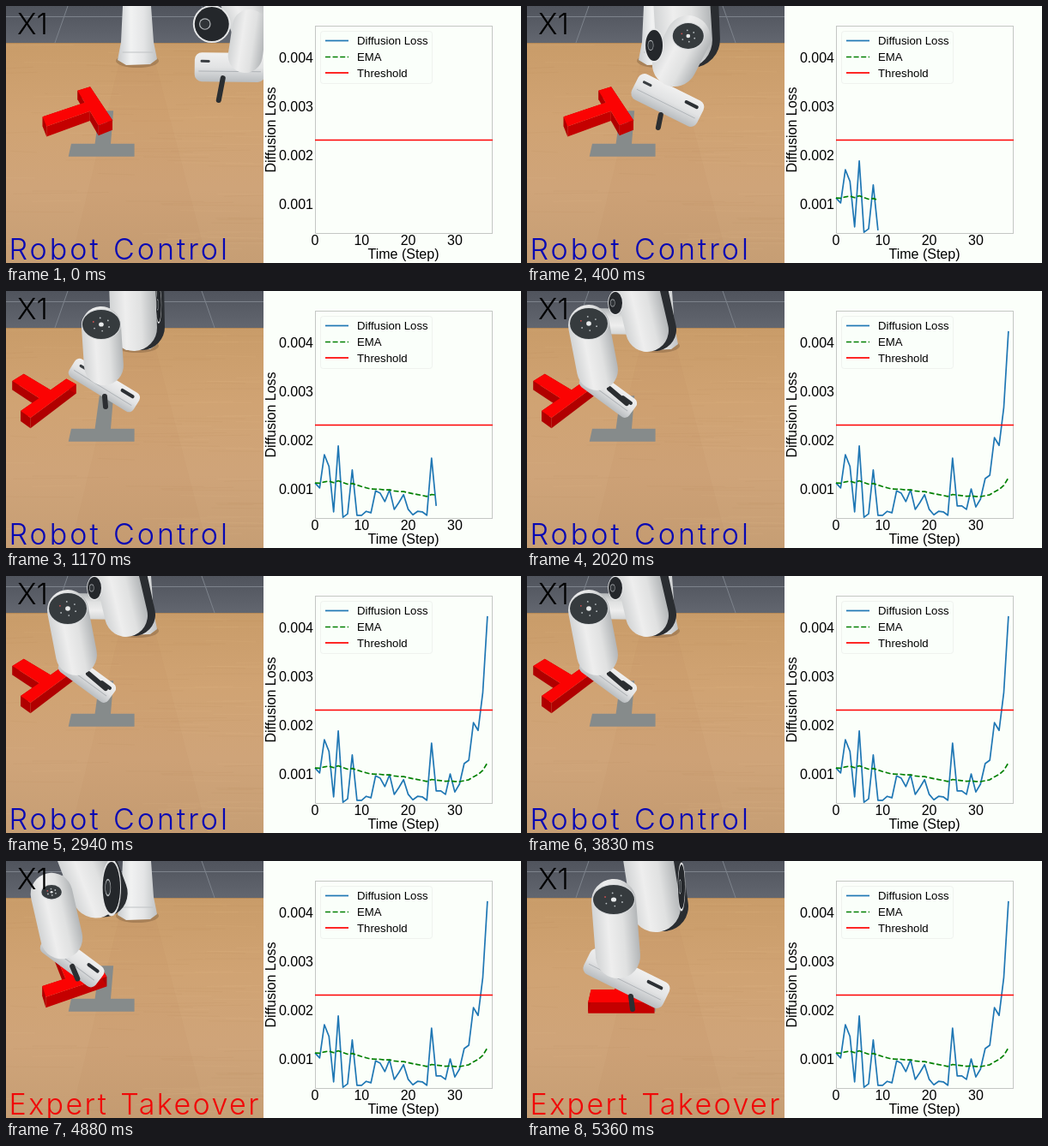
An HTML page with a canvas for the animation above (5400 ms loop, 600 px wide and 300 px high).

```html
<!DOCTYPE html>
<html lang="en">
<head>
<meta charset="utf-8">
<title>Robot control and diffusion loss</title>
<style>
  html, body { margin: 0; width: 100%; height: 100%; overflow: hidden; background: #fbfffa; }
  canvas, svg { position: absolute; left: 0; top: 0; display: block; }
  text { font: 16px "Liberation Sans", Arial, sans-serif; fill: #000; }
  .legend { font-size: 13.2px; }
  .hud { font: 300 34px Inter, "Open Sans", sans-serif; word-spacing: 2px; }
  .line { fill: none; stroke-width: 1.7; stroke-linejoin: round; }
  .loss { stroke: #1f77b4; }
  .ema { stroke: #008000; stroke-dasharray: 6 2.6; }
  .limit { stroke: #f00; }
</style>
</head>
<body>
<canvas id="scene" width="300" height="300"></canvas>
<svg width="600" height="300" viewBox="0 0 600 300">
  <text class="hud" x="13" y="33">X1</text>
  <text class="hud" id="mode" x="3.5" y="296"></text>

  <rect x="360.5" y="23.5" width="206" height="242" fill="none" stroke="#c4c7c4"/>
  <g id="ticks"></g>
  <text x="463" y="295" text-anchor="middle">Time (Step)</text>
  <text transform="translate(314 144.5) rotate(-90)" text-anchor="middle">Diffusion Loss</text>
  <path class="line loss" id="loss"/>
  <path class="line ema" id="ema"/>
  <path class="line limit" d="M360 156.5H567"/>

  <rect x="366.5" y="29.5" width="130" height="61" rx="3" fill="#fbfffa" fill-opacity=".8" stroke="#eff2ee"/>
  <path class="line loss" d="M372 40.5H399"/>
  <path class="line ema" d="M372 59.5H399"/>
  <path class="line limit" d="M372 78H399"/>
  <text class="legend" x="409" y="45">Diffusion Loss</text>
  <text class="legend" x="409" y="64">EMA</text>
  <text class="legend" x="409" y="82.5">Threshold</text>
</svg>
<script>
const LOOP = 5400, TAKEOVER = 3910;
const $ = id => document.getElementById(id);
const ctx = $("scene").getContext("2d");

// Loss per step, in units of 1e-5
const losses = [112, 102, 170, 146, 53, 188, 42, 49, 139, 46, 46, 54, 51, 96, 91, 74, 98, 58, 72,
  88, 58, 47, 54, 53, 46, 163, 65, 65, 58, 100, 63, 79, 121, 128, 205, 189, 267, 423];
const emas = [];
losses.forEach((v, i) => emas.push(i ? emas[i - 1] * 0.95 + v * 0.05 : v));

// Arm poses: fore and body are [x, y, x, y, radius], joint and disc are ellipses,
// hand is [x, y, x, y, thickness], finger is [x, y, x, y]
const start = {
  fore: [272, -14, 294, 40, 25], joint: [240, 21, 20, 20], body: [284, 24, 279, 58, 20],
  disc: [0, 0], hand: [220, 71, 302, 72, 34], finger: [253, 84, 248, 110]
};
const approach = {
  fore: [180, -10, 183, 40, 33], joint: [148, 46, 10, 18], body: [188, 37, 172, 68, 26],
  disc: [18, 15], hand: [126, 91, 202, 129, 33], finger: [156, 127, 153, 142]
};
const pushed = {
  fore: [147, -10, 149, 43, 27], joint: [178, 16, 3, 20], body: [111, 41, 114, 87, 23],
  disc: [22, 17], hand: [77, 87, 152, 133, 25], finger: [115, 123, 116, 135]
};
const stalled = {
  fore: [127, -10, 140, 46, 25], joint: [103, 14, 8, 13], body: [72, 40, 82, 92, 24],
  disc: [22, 18], hand: [66, 98, 123, 140, 26], finger: [96, 114, 116, 131]
};
const reach = {
  fore: [30, -24, 62, 24, 27], joint: [69, 32, 16, 34], body: [8, 30, 26, 70, 23],
  disc: [0, 0], hand: [22, 70, 59, 119, 24], finger: [36, 90, 46, 104]
};
const placed = {
  fore: [140, -10, 150, 54, 29], joint: [180, 30, 4, 26], body: [101, 47, 106, 111, 26],
  disc: [24, 17], hand: [70, 114, 162, 160, 33], finger: [121, 158, 123, 173]
};

function shift(pose, dx, dy) {
  const move = ([x, y, u, v, ...rest]) => [x + dx, y + dy, u + dx, v + dy, ...rest];
  return { ...pose, body: move(pose.body), hand: move(pose.hand), finger: move(pose.finger) };
}

const armKeys = [
  [0, start], [400, approach], [900, shift(pushed, -28, -5)], [1170, pushed], [1730, stalled],
  [TAKEOVER, stalled], [4430, reach], [5360, placed]
];
// Ground x, ground y and heading of the T block
const blockKeys = [
  [620, [-54, -59.7, 151.7]], [900, [-109.4, -45.6, 216.5]],
  [4450, [-109.4, -45.6, 216.5]], [5280, [-39, 2.5, 270]]
];
const stepKeys = [[0, [0]], [400, [9]], [1170, [26]], [1730, [37]]];

function mix(a, b, k) {
  if (typeof a === "number") return a + (b - a) * k;
  if (Array.isArray(a)) return a.map((v, i) => mix(v, b[i], k));
  return Object.fromEntries(Object.keys(a).map(key => [key, mix(a[key], b[key], k)]));
}

function sample(keys, t) {
  if (t <= keys[0][0]) return keys[0][1];
  const i = keys.findIndex(key => key[0] > t);
  if (i < 0) return keys[keys.length - 1][1];
  const [t0, a] = keys[i - 1], [t1, b] = keys[i];
  return mix(a, b, (t - t0) / (t1 - t0));
}

function poly(points, fill) {
  ctx.beginPath();
  points.forEach(p => ctx.lineTo(...p));
  ctx.closePath();
  ctx.fillStyle = fill;
  ctx.fill();
}

function oval(x, y, rx, ry, fill) {
  ctx.beginPath();
  ctx.ellipse(x, y, Math.max(rx, 0), Math.max(ry, 0), 0, 0, 7);
  ctx.fillStyle = fill;
  ctx.fill();
}

function line(x, y, u, v, width, color) {
  ctx.beginPath();
  ctx.moveTo(x, y);
  ctx.lineTo(u, v);
  ctx.lineWidth = width;
  ctx.lineCap = "round";
  ctx.strokeStyle = color;
  ctx.stroke();
}

function shade(x0, y0, x1, y1, ...colors) {
  const g = ctx.createLinearGradient(x0, y0, x1, y1);
  colors.forEach((c, i) => g.addColorStop(i / (colors.length - 1), c));
  return g;
}

function capsule([x, y, u, v, r]) {
  const d = Math.hypot(u - x, v - y), nx = (v - y) / d * r, ny = (x - u) / d * r;
  const fill = shade(x - nx, y - ny, x + nx, y + ny, "#d2d4d5", "#eeeeee", "#e0e1e1", "#b3b6b8");
  line(x, y, u, v, 2 * r, fill);
}

// Ground plane to screen
function project(gx, gy) {
  const s = 1 / (1 - 0.0023 * gy);
  return [150 + gx * s, 168 + 0.8 * gy * s, s];
}

const tee = [[-2, -.5], [2, -.5], [2, .5], [.5, .5], [.5, 3.5], [-.5, 3.5], [-.5, .5], [-2, .5]];

function footprint([gx, gy, deg]) {
  const c = Math.cos(deg * Math.PI / 180) * 18.8, s = Math.sin(deg * Math.PI / 180) * 18.8;
  return tee.map(([a, b]) => project(gx - s * a + c * b, gy + c * a + s * b));
}

function drawBlock(place) {
  const base = footprint(place).map(([x, y, s]) => [x, y, y - 12.5 * s]);
  base.forEach(([x, y, top], i) => {
    const [u, v, end] = base[(i + 1) % base.length];
    poly([[x, y], [u, v], [u, end], [x, top]], Math.abs(u - x) > Math.abs(v - y) * 1.6 ? "#c40000" : "#b00000");
  });
  poly(base.map(([x, , top]) => [x, top]), "#fb0303");
}

function drawRoom() {
  ctx.fillStyle = shade(0, 0, 0, 43, "#50545d", "#62666f");
  ctx.fillRect(0, 0, 300, 43);
  line(0, 12.5, 300, 12.5, 1, "#7d838c");
  line(72, 0, 57, 43, 1, "#7d838c");
  line(228, 0, 243, 43, 1, "#7d838c");
  ctx.fillStyle = shade(0, 43, 0, 300, "#c99c69", "#d0a373", "#cfa479", "#c69e74");
  ctx.fillRect(0, 43, 300, 257);
  line(0, 43.5, 300, 43.5, 1, "#b58a58");

  let seed = 7;
  const random = () => (seed = seed * 16807 % 2147483647) / 2147483647;
  for (let i = 0; i < 90; i++) {
    const x = random() * 300 - 30, y = 46 + random() * 252, w = 30 + random() * 90;
    line(x, y, x + w, y + random() * 4 - 2, 1, i % 2 ? "rgba(120,75,30,.04)" : "rgba(255,220,170,.06)");
  }
  poly([[132, 66], [174, 66], [235, 300], [75, 300]], "rgba(120,80,45,.03)");
  poly(footprint([-38, 0, 270]), "#868b8b");
}

function drawColumn() {
  oval(153, 64, 25, 8, "rgba(70,50,30,.25)");
  const white = shade(130, 0, 176, 0, "#c9cccf", "#f1f2f2", "#e4e5e6", "#c0c3c5");
  poly([[136, 0], [169, 0], [172, 42], [176, 62], [168, 68], [140, 69], [130, 63], [134, 42]], white);
  line(136, 54, 171, 54, 1, "#bfc2c4");
}

function drawHand([x, y, u, v, h]) {
  const len = Math.hypot(u - x, v - y);
  ctx.save();
  ctx.translate(x, y);
  ctx.rotate(Math.atan2(v - y, u - x));
  ctx.beginPath();
  ctx.roundRect(0, -h / 2, len, h, h / 4);
  ctx.fillStyle = shade(0, -h / 2, 0, h / 2, "#f0f0f0", "#e2e3e4", "#b9bdc0");
  ctx.fill();
  line(5, h * .14, len - 5, h * .14, 1, "#aeb2b6");
  line(len * .74, -h * .24, len * .9, -h * .24, 4, "#2c3034");
  line(len * .1, -h * .2, len * .2, -h * .2, 3, "#3a3e42");
  ctx.restore();
}

function drawDisc(x, y, [rx, ry]) {
  if (rx < 1) return;
  oval(x, y, rx + 1, ry + 1, "#d8dadc");
  oval(x, y, rx, ry, "#363b3e");
  oval(x, y, rx * .13, ry * .15, "#e9ebec");
  for (let i = 0; i < 6; i++) {
    const a = i * Math.PI / 3 + .4;
    oval(x + Math.cos(a) * rx * .45, y + Math.sin(a) * ry * .45, .9, .9, i === 3 ? "#d05050" : "#b9bfc2");
  }
}

function drawJoint([x, y, rx, ry]) {
  oval(x, y, rx * 1.1, ry * 1.1, "#e6e7e8");
  oval(x, y, rx, ry, "#24272b");
  oval(x - rx * .4, y, rx * .34, ry * .34, "#b4b8bb");
  oval(x - rx * .4, y, rx * .28, ry * .28, "#2f3337");
}

function drawArm({ fore, joint, body, disc, hand, finger }) {
  const [x, y, u, v, r] = fore;
  line(x + 10, y, u + 9, v - 1, 2 * r, "#2a2d31");
  capsule([body[0], body[1] - 5, u, v - 10, 15]);
  capsule(fore);
  drawHand(hand);
  line(...finger, 6, "#2b2e31");
  capsule(body);
  drawDisc(body[0], body[1] - 2, disc);
  drawJoint(joint);
}

const plotX = i => 360 + i * 5.43;
const plotY = v => 231 - (v - 100) * 0.57;
const trace = (values, n) =>
  "M" + values.slice(0, n + 1).map((v, i) => plotX(i).toFixed(1) + " " + plotY(v).toFixed(1)).join("L");

function label(x, y, anchor, value) {
  const node = document.createElementNS("http://www.w3.org/2000/svg", "text");
  node.setAttribute("x", x);
  node.setAttribute("y", y);
  node.setAttribute("text-anchor", anchor);
  node.textContent = value;
  $("ticks").append(node);
}
for (let i = 1; i <= 4; i++) label(358, plotY(i * 100) + 5.5, "end", "0.00" + i);
for (let i = 0; i <= 30; i += 10) label(plotX(i), 279, "middle", i);

function setMode(expert) {
  const mode = $("mode");
  mode.textContent = expert ? "Expert Takeover" : "Robot Control";
  mode.style.fill = expert ? "#f00808" : "#0808b4";
  mode.style.letterSpacing = expert ? "2.4px" : "3px";
}

function render(t) {
  drawRoom();
  drawColumn();
  drawBlock(sample(blockKeys, t));
  drawArm(sample(armKeys, t));
  const n = Math.floor(sample(stepKeys, t)[0] + 0.05);
  $("loss").setAttribute("d", trace(losses, n));
  $("ema").setAttribute("d", trace(emas, n));
  setMode(t >= TAKEOVER);
}

const origin = performance.now();
function tick() {
  render((performance.now() - origin) % LOOP);
  requestAnimationFrame(tick);
}
tick();
</script>
</body>
</html>
```
